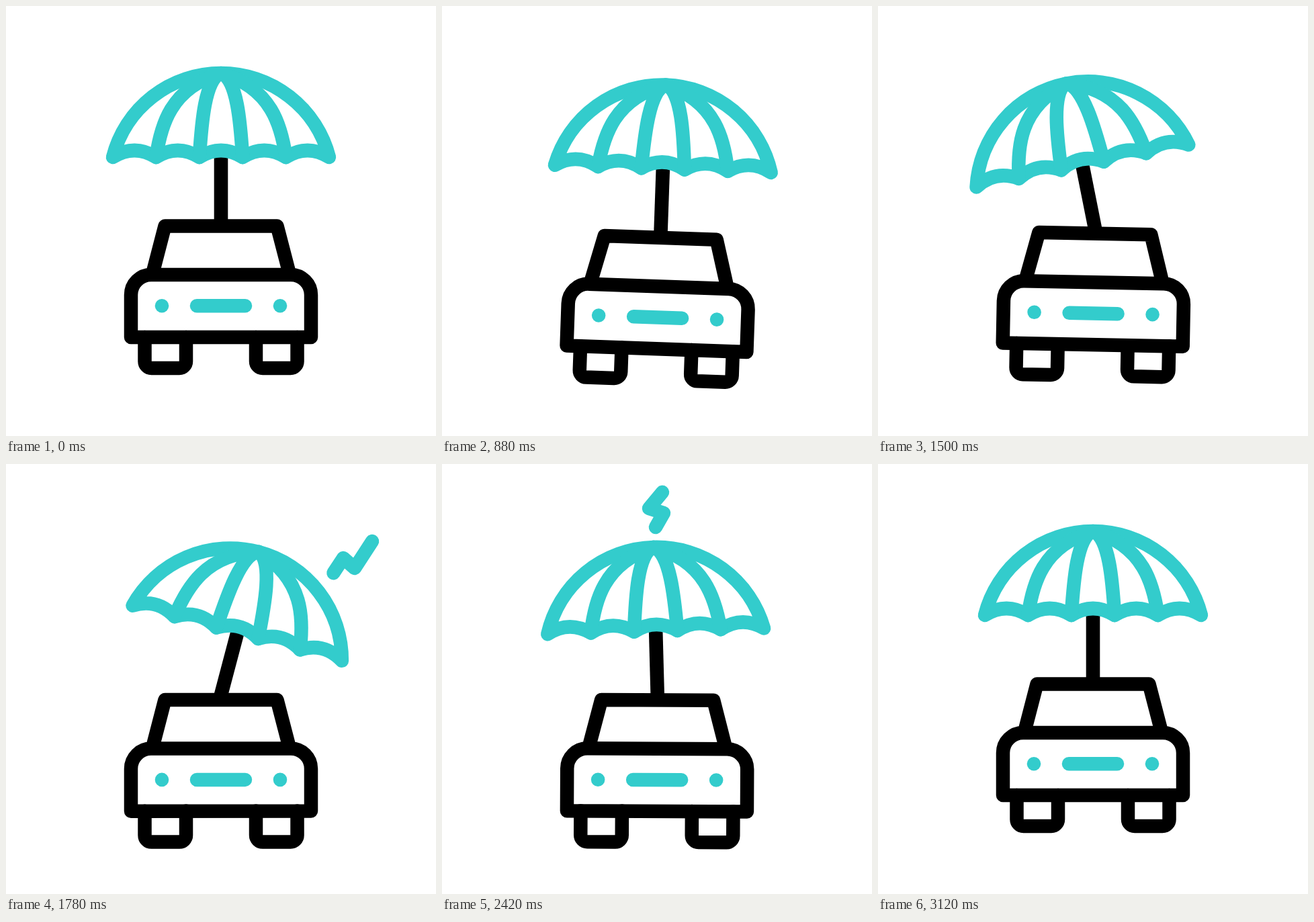
An HTML page with a canvas that plays this animation: 640 px wide and 640 px high, repeating every 6140 ms.

```html
<!DOCTYPE html>
<html lang="en">
<head>
<meta charset="utf-8">
<title>Car under umbrella</title>
<style>
html, body { margin: 0; width: 100%; height: 100%; overflow: hidden; background: #fff; }
canvas { display: block; width: 100vw; height: 100vh; }
</style>
</head>
<body>
<canvas id="stage" width="640" height="640"></canvas>
<script>
const ctx = document.getElementById('stage').getContext('2d');
const LOOP = 6140, TEAL = '#33cccc', BLACK = '#000';

// Keyframes: [time, value], eased with a cosine in between.
const lift = [[210, 0], [600, -29], [970, 24.5], [1300, 1], [1740, 24.5], [2065, 1], [2465, 24.5], [2830, 0]];
const tilt = [[640, 0], [920, 2.1], [1260, -2.1], [1610, 2], [1950, -2], [2270, 2], [2600, -2], [2840, 0]];
const lean = [[1040, 0], [1430, -15], [1800, 15], [2230, -4.8], [2560, 0]];

// Bolts: points, then the times of drawing on and off.
const sideBolt = [[111, 130], [138, 146], [130, 158], [146, 168]];
const bolts = [
  { pts: [[96, 116], [135, 141], [122, 159], [153, 181]], on: [1060, 1300], off: [1340, 1480] },
  { pts: [[545, 115], [519, 155], [502, 140], [481, 172]], on: [1600, 1830], off: [1870, 2020] },
  { pts: [[328, 42], [308, 66], [330, 73], [318, 94]], on: [2260, 2420], off: [2440, 2600] },
  { pts: sideBolt, on: [2720, 2880], off: [2920, 3120] },
  { pts: sideBolt.map(([x, y]) => [640 - x, y]), on: [2720, 2880], off: [2920, 3120] }
];

const ease = p => (1 - Math.cos(Math.PI * Math.min(1, Math.max(0, p)))) / 2;
const span = (t, [a, b]) => ease((t - a) / (b - a));

function at(keys, t) {
  let v = keys[0][1];
  for (let i = 1; i < keys.length; i++) {
    v += (keys[i][1] - keys[i - 1][1]) * span(t, [keys[i - 1][0], keys[i][0]]);
  }
  return v;
}

function turn(x, y, deg) {
  ctx.translate(x, y);
  ctx.rotate(deg * Math.PI / 180);
  ctx.translate(-x, -y);
}

function stroke(d, color) {
  ctx.strokeStyle = color;
  ctx.stroke(new Path2D(d));
}

function dot(x, y) {
  ctx.fillStyle = TEAL;
  ctx.beginPath();
  ctx.arc(x, y, 10.3, 0, 2 * Math.PI);
  ctx.fill();
}

let canopy = 'M159 225A166.2 166.2 0 0 1 481 225';
for (let i = 4; i >= 0; i--) {
  const x = 159 + i * 64.4;
  canopy += `Q${x + 32.2} 205 ${x} 225`;
}
canopy += 'Z';
const ribs = 'M223.4 225C230 180 244 122 320 100C396 122 410 180 416.6 225' +
  'M287.8 225C291 175 296 108 320 100C344 108 349 175 352.2 225';

function drawUmbrella() {
  ctx.fillStyle = BLACK;
  ctx.fillRect(309.7, 215, 20.6, 111);
  stroke(canopy, TEAL);
  stroke(ribs, TEAL);
}

function drawCar() {
  stroke('M219.5 393L236.5 327.5H403.5L420.5 393', BLACK);
  stroke('M186 493V430A30 30 0 0 1 216 400H424A30 30 0 0 1 454 430V493Z', BLACK);
  for (const x of [206.5, 372]) {
    stroke(`M${x} 493V529A10 10 0 0 0 ${x + 10} 539H${x + 51.5}A10 10 0 0 0 ${x + 61.5} 529V493`, BLACK);
  }
  stroke('M284 446.3H356', TEAL);
  dot(232, 446.3);
  dot(408, 446.3);
}

function drawBolt({ pts, on, off }, t) {
  const from = span(t, off), to = span(t, on);
  if (to <= from) return;
  let len = 0;
  for (let i = 1; i < pts.length; i++) {
    len += Math.hypot(pts[i][0] - pts[i - 1][0], pts[i][1] - pts[i - 1][1]);
  }
  ctx.save();
  ctx.setLineDash([len * (to - from), len * 2]);
  ctx.lineDashOffset = -len * from;
  stroke('M' + pts.join('L'), TEAL);
  ctx.restore();
}

function draw(t) {
  ctx.fillStyle = '#fff';
  ctx.fillRect(0, 0, 640, 640);
  ctx.lineWidth = 20.5;
  ctx.lineCap = ctx.lineJoin = 'round';

  ctx.save();
  ctx.translate(0, at(lift, t));
  turn(320, 478, at(tilt, t));
  ctx.save();
  turn(320, 320, at(lean, t));
  drawUmbrella();
  ctx.restore();
  drawCar();
  ctx.restore();

  bolts.forEach(b => drawBolt(b, t));
}

const start = performance.now();
function tick() {
  draw((performance.now() - start) % LOOP);
  requestAnimationFrame(tick);
}
tick();
</script>
</body>
</html>
```
